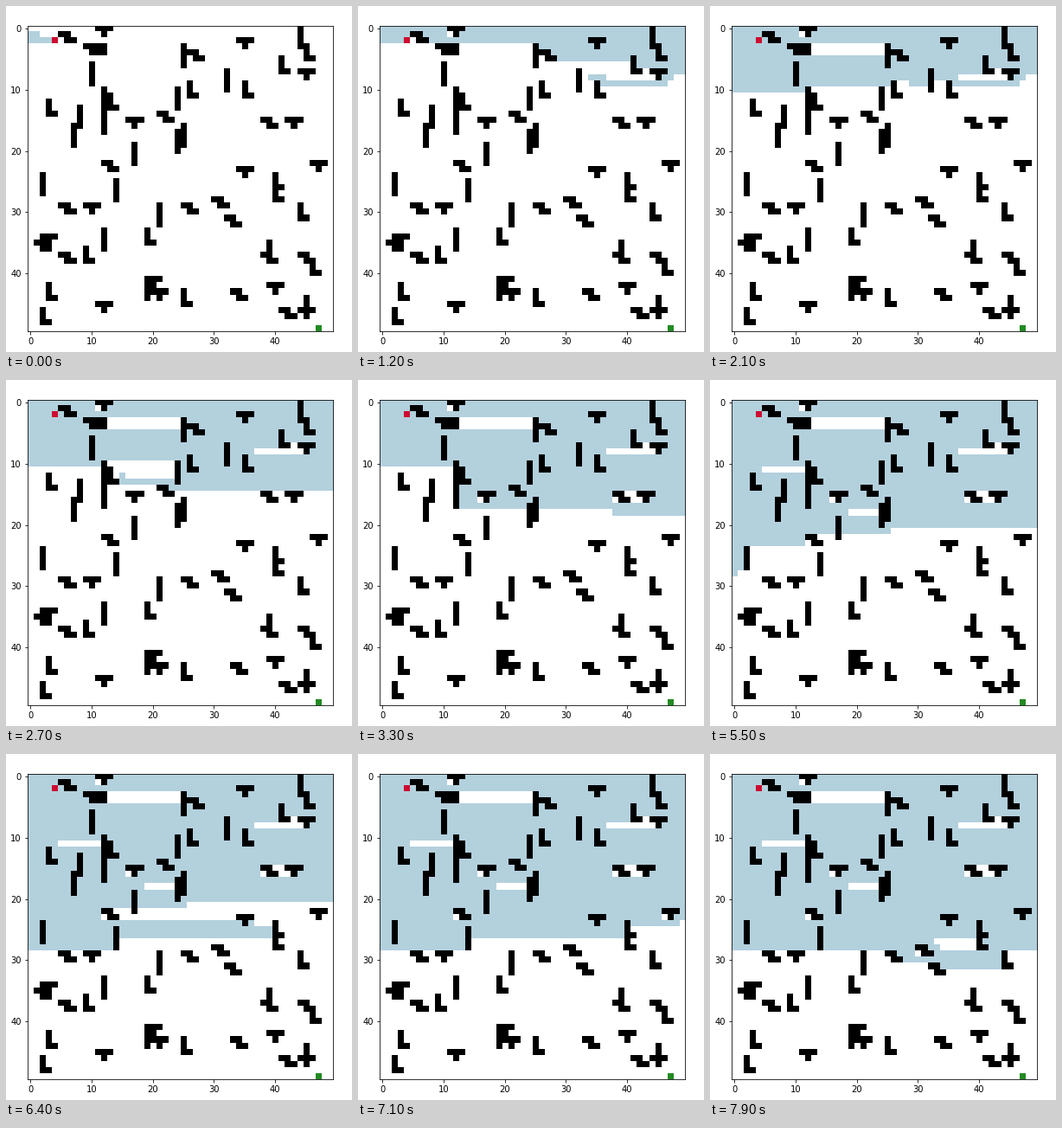
Write a matplotlib script that moves like this. It is 400x400 px and loops after 8000 ms.

```python
import numpy as np
import matplotlib.pyplot as plt
from matplotlib.animation import FuncAnimation
from matplotlib.colors import to_rgb

SIZE, FRAMES, INTERVAL = 50, 80, 100
START, GOAL = (4, 2), (47, 49)
FREE, WALL, SEEN = "#ffffff", "#000000", "#b3d0dd"
RED, GREEN = "#cc0c2e", "#228b22"

SHAPES = {
    "I": [(0, 0), (0, 1), (0, 2), (0, 3)],
    "T": [(0, 0), (1, 0), (2, 0), (1, 1)],
    "Z": [(0, 0), (1, 0), (1, 1), (2, 1)],
    "L": [(0, 0), (0, 1), (0, 2), (1, 2)],
}

# top-left corner (column, row) of every piece
PIECES = {
    "I": [(10, 6), (12, 10), (12, 14), (8, 13), (7, 16), (24, 10), (25, 16),
          (24, 17), (17, 19), (14, 25), (2, 24), (25, 3), (32, 7), (44, 0),
          (21, 29), (12, 33), (19, 41), (39, 35), (45, 44)],
    "T": [(11, 0), (10, 3), (16, 15), (34, 2), (44, 7), (42, 15), (46, 22),
          (34, 23), (9, 29), (2, 34), (11, 45), (19, 41), (20, 43), (39, 42),
          (44, 46)],
    "Z": [(5, 1), (9, 3), (10, 3), (21, 14), (12, 22), (26, 4), (38, 15),
          (30, 28), (32, 31), (25, 29), (5, 29), (1, 35), (5, 37), (33, 43),
          (38, 37), (44, 37), (41, 46)],
    "L": [(13, 11), (3, 12), (26, 9), (35, 9), (45, 3), (41, 5), (40, 24),
          (40, 26), (44, 29), (19, 33), (9, 36), (3, 42), (2, 46), (25, 43),
          (46, 38)],
}

walls = {(x + dx, y + dy) for kind, spots in PIECES.items()
         for x, y in spots for dx, dy in SHAPES[kind]}


def neighbours(cell):
    x, y = cell
    for nx, ny in ((x - 1, y), (x + 1, y), (x, y - 1), (x, y + 1)):
        if 0 <= nx < SIZE and 0 <= ny < SIZE and (nx, ny) not in walls:
            yield nx, ny


def depth_first(start):
    """Cells in the order a left, right, up, down search reaches them."""
    order, seen = [start], {start}
    stack = [neighbours(start)]
    while stack:
        cell = next((c for c in stack[-1] if c not in seen), None)
        if cell is None:
            stack.pop()
        else:
            seen.add(cell)
            order.append(cell)
            stack.append(neighbours(cell))
    return order


order = depth_first(START)

# the search speeds up and slows down along the way
PACE = [(0, 7), (12, 221), (21, 417), (33, 694), (47, 829), (64, 1072), (79, 1280)]
counts = np.rint(np.interp(np.arange(FRAMES), *zip(*PACE))).astype(int)

base = np.empty((SIZE, SIZE, 3))
base[:] = to_rgb(FREE)
for x, y in walls:
    base[y, x] = to_rgb(WALL)


def grid(count):
    img = base.copy()
    xs, ys = np.array(order[:count]).T
    img[ys, xs] = to_rgb(SEEN)
    for (x, y), color in ((START, RED), (GOAL, GREEN)):
        img[y, x] = to_rgb(color)
    return img


plt.rcParams.update({
    "font.family": "DejaVu Sans", "font.size": 9, "axes.linewidth": 0.72,
    "xtick.major.size": 3.15, "ytick.major.size": 3.15,
    "xtick.major.pad": 3.15, "ytick.major.pad": 3.15,
    "xtick.major.width": 0.72, "ytick.major.width": 0.72,
})
fig = plt.figure(figsize=(5, 5), dpi=80, facecolor="white")
side = 353.5 / 400
ax = fig.add_axes([24.6 / 400, 1 - 22.7 / 400 - side, side, side])
image = ax.imshow(grid(counts[0]), interpolation="nearest")
ax.set_xticks(range(0, SIZE, 10))
ax.set_yticks(range(0, SIZE, 10))


def update(i):
    image.set_data(grid(counts[i]))
    return [image]


anim = FuncAnimation(fig, update, frames=FRAMES, interval=INTERVAL,
                     repeat=True, repeat_delay=0, blit=False)
plt.show()
```
